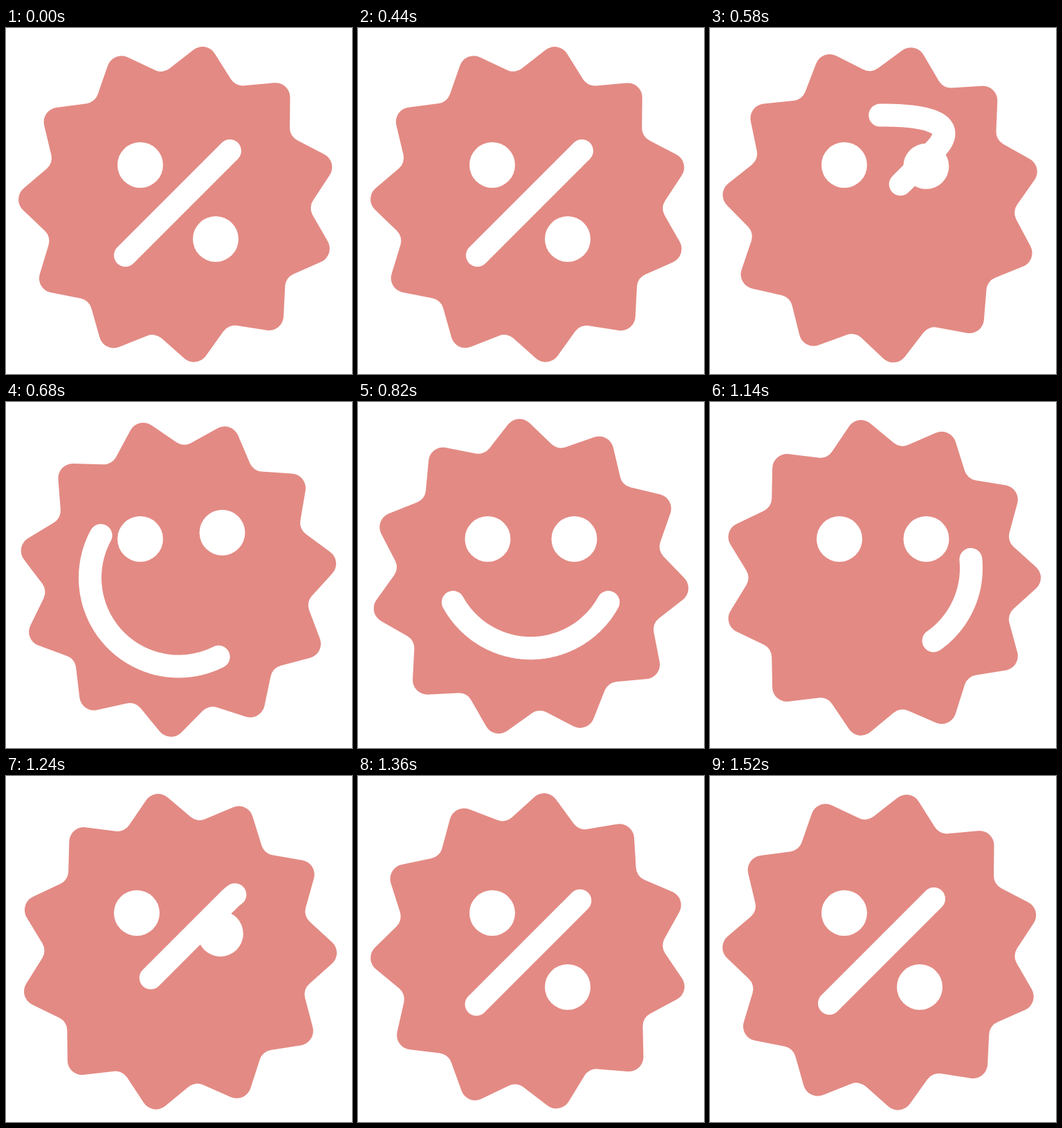
Recreate the animation shown at these times as an HTML page with a canvas. Size 500x500 px, loop 2320 ms.

```html
<!DOCTYPE html>
<html lang="en">
<head>
<meta charset="utf-8">
<title>Discount badge</title>
<style>
  html, body { margin: 0; width: 100%; height: 100%; overflow: hidden; background: #fff; }
  canvas { display: block; width: 100vw; height: 100vh; }
</style>
</head>
<body>
<canvas id="stage" width="500" height="500"></canvas>
<script>
const ctx = document.getElementById('stage').getContext('2d');
const LOOP = 2320, START = 440, TURN = 970, END = 1520, STEP = 20;
const RAD = Math.PI / 180;
const low = [172.5, 328.5], high = [323.5, 177.5];

const mix = (a, b, k) => a + (b - a) * k;
const span = (t, a, b) => Math.min(1, Math.max(0, (t - a) / (b - a)));
const cubic = x => x < .5 ? 4 * x ** 3 : 1 - 4 * (1 - x) ** 3;
const ease = (t, a, b) => cubic(span(t, a, b));
const back = x => 1 + 2.7 * (x - 1) ** 3 + 1.7 * (x - 1) ** 2;
const bump = (t, a, b) => Math.sin(Math.PI * span(t, a, b));
const line = (a, b, k) => [mix(a[0], b[0], k), mix(a[1], b[1], k)];
const onRing = (deg, cy) => [249.5 + 128 * Math.cos(deg * RAD), cy + 128 * Math.sin(deg * RAD)];

function bezier(a, b, c, d, k) {
  const m = line(b, c, k);
  return line(line(line(a, b, k), m, k), line(m, line(c, d, k), k), k);
}

// One full turn along a steep S-curve
function turn(t) {
  if (t < START || t >= END) return 0;
  const d = t - 977.5;
  const bend = d < 0 ? 1.45e-8 : 4.4e-9;
  return 360 / (1 + Math.exp(-(.011 * d + bend * d ** 3)));
}

function badge(angle) {
  const teeth = 11, pts = [];
  for (let i = 0; i < teeth * 2; i++) {
    const r = i % 2 ? 189 : 240.4;
    const a = (180 + 1.7 + angle + i * 180 / teeth) * RAD;
    pts.push([248 + r * Math.cos(a), 254 + r * Math.sin(a)]);
  }
  const n = pts.length;
  ctx.fillStyle = '#e38a84';
  ctx.beginPath();
  ctx.moveTo(...line(pts[n - 1], pts[0], .5));
  pts.forEach((p, i) => ctx.arcTo(...p, ...pts[(i + 1) % n], i % 2 ? 20 : 21));
  ctx.closePath();
  ctx.fill();
}

function dot(x, y) {
  ctx.beginPath();
  ctx.arc(x, y, 33, 0, 2 * Math.PI);
  ctx.fill();
}

// Slash, hook over the top, then round the ring to the smile
function wayIn(u, cy) {
  if (u <= 1) return line(low, high, u);
  if (u < 2) return bezier(high, [365, 136], [310, cy - 128], onRing(270, cy), u - 1);
  return onRing(270 - (u - 2) * 90, cy);
}

// Smile, up the right side, hook back into the slash
function wayOut(v, cy) {
  if (v <= 1) return onRing(151.2 - v * 161.2, cy);
  if (v < 2) return bezier(onRing(-10, cy), [371, 185], [350, 151], high, v - 1);
  return line(high, low, v - 2);
}

function bar(t) {
  let tail, head, cy, way;
  if (t < TURN) {
    way = wayIn;
    tail = 3.32 * ease(t, START, 817);
    head = 1 + 3.68 * ease(t, START, 781);
    cy = mix(254, 226.5, ease(t, 680, 860));
  } else {
    way = wayOut;
    tail = 2 * ease(t, 1020, 1305) + .022 * bump(t, 1300, 1500);
    head = .759 + 2.241 * ease(t, 1070, 1313) + .012 * bump(t, 1300, 1500);
    cy = mix(226.5, 254, ease(t, 1000, 1280));
  }
  const steps = 80;
  ctx.beginPath();
  for (let i = 0; i <= steps; i++) ctx.lineTo(...way(mix(tail, head, i / steps), cy));
  ctx.stroke();
}

function eyes(t) {
  const leave = ease(t, 1170, 1340);
  const rise = back(span(t, 470, 780));
  const side = ease(t, 700, 860);
  dot(mix(mix(194, 187, side), 194, leave), 198);
  dot(mix(mix(303, 312.5, Math.min(1, rise)), 303, leave), mix(mix(305, 198, rise), 305, leave));
}

function draw(now) {
  // Moves in even ticks; the small lead absorbs timer rounding
  const t = Math.floor((now + 2) / STEP) * STEP % LOOP;
  ctx.fillStyle = '#fff';
  ctx.fillRect(0, 0, 500, 500);
  badge(turn(t));
  ctx.fillStyle = ctx.strokeStyle = '#fff';
  ctx.lineWidth = 33;
  ctx.lineCap = ctx.lineJoin = 'round';
  eyes(t);
  bar(t);
}

const begin = performance.now();
function tick() {
  draw(performance.now() - begin);
  requestAnimationFrame(tick);
}
tick();
</script>
</body>
</html>
```
